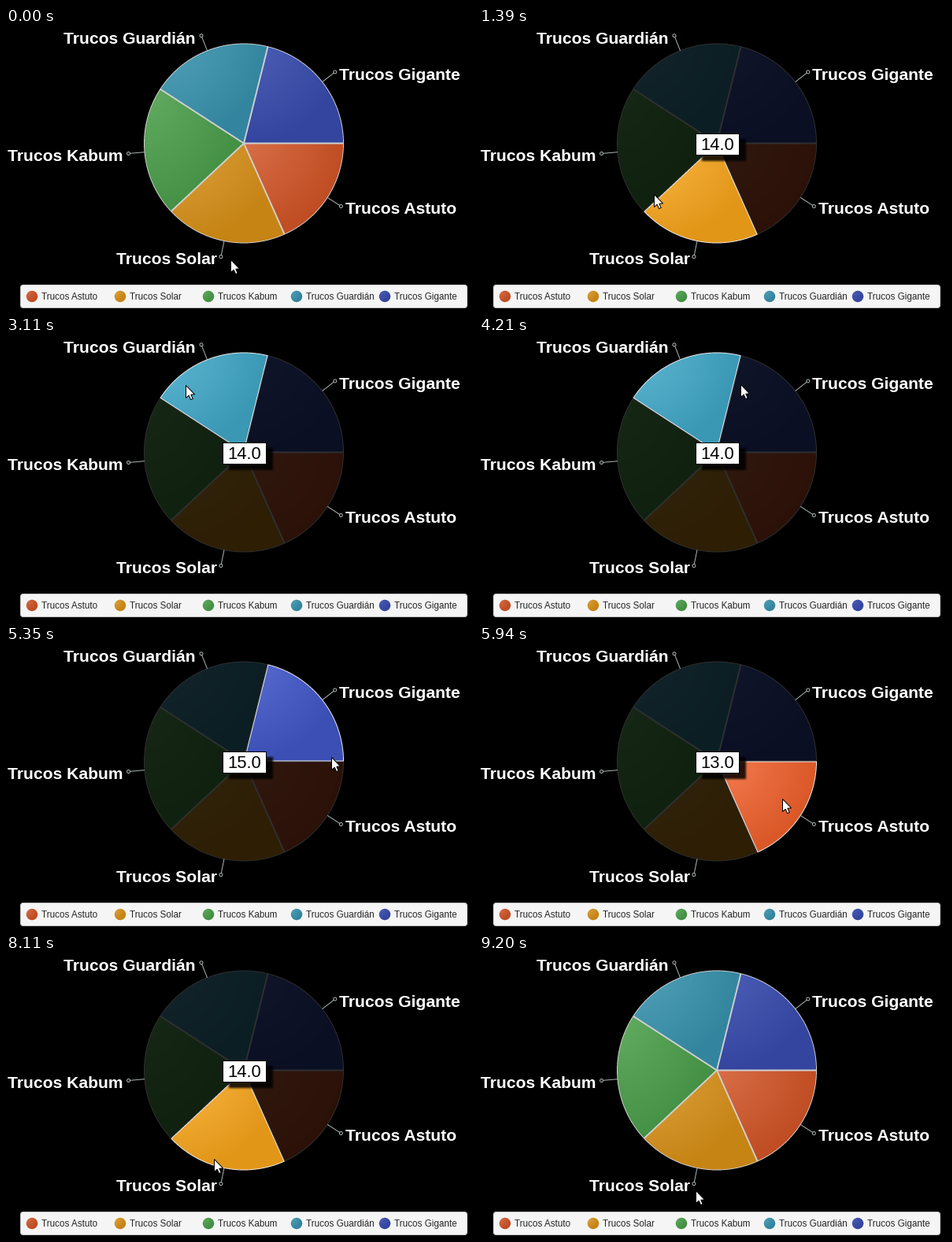
A matplotlib script that plays this animation: 593x357 px, repeating every 9.22 s.

```python
import colorsys

import numpy as np
import matplotlib.pyplot as plt
from matplotlib.animation import FuncAnimation
from matplotlib.colors import to_rgb
from matplotlib.patches import Circle, FancyBboxPatch, Polygon, Rectangle

W, H, DPI = 593, 357, 64
LOOP, STEP = 9220, 20
CX, CY, R = 302, 146.5, 127
SS = 4  # supersampling of the shaded shapes
NORMAL, DIM = 0.88, 0.2

# name, value, colour, label x, label baseline, legend dot x
SLICES = [
    ("Trucos Astuto", 13, "#f3622d", 431, 236, 33),
    ("Trucos Solar", 14, "#fba71b", 140, 300, 145),
    ("Trucos Kabum", 15, "#57b757", 2, 169, 257),
    ("Trucos Guardián", 14, "#41a9c9", 73, 20, 369),
    ("Trucos Gigante", 15, "#4258c9", 423, 66, 481),
]
ASTUTO, SOLAR, KABUM, GUARDIAN, GIGANTE = range(5)

# time, x, y of the pointer tip
PATH = np.array([
    (80, 285, 294), (480, 262, 237), (760, 262, 237), (1390, 222, 211),
    (1660, 204, 185), (2500, 192, 94), (2630, 192, 94), (3110, 228, 61),
    (3330, 228, 61), (3550, 255, 48), (3720, 255, 48), (4640, 400, 71),
    (5350, 413, 141), (5560, 411, 163), (6490, 350, 238), (6530, 350, 238),
    (6780, 334, 244), (7440, 284, 251), (7900, 264, 258), (8110, 264, 259),
    (8280, 265, 260), (8450, 265, 260), (8470, 266, 262), (8680, 266, 262),
    (9200, 275, 299),
])
HOVERS = [(0, None), (270, SOLAR), (1420, KABUM), (2850, GUARDIAN),
          (4320, GIGANTE), (5600, ASTUTO), (7490, SOLAR), (8890, None)]

ARROW = np.array([(0.5, 0.5), (0.5, 16.5), (4.2, 13.2), (6.6, 18.6),
                  (9.2, 17.5), (6.8, 12.2), (11.6, 12)])


def pt(px):
    return px * 72 / DPI


def tones(color):
    """Light and dark ends of the gradient for a base colour."""
    r, g, b = to_rgb(color)
    luma = 0.3 * r + 0.59 * g + 0.11 * b
    lift = 0.2 * (1 if luma > 0.6 else 0.9 if luma > 0.5 else
                  0.8 if luma > 0.4 else 0.7)
    h, s, v = colorsys.rgb_to_hsv(r, g, b)
    light = colorsys.hsv_to_rgb(h, s * (1 - lift), v + (1 - v) * lift)
    return np.array(light), np.array([r, g, b]) * 0.9


def shade(x, y, mask, color):
    """Radial gradient from the top left of the mask's bounding box."""
    x0, x1, y0, y1 = x[mask].min(), x[mask].max(), y[mask].min(), y[mask].max()
    t = np.hypot((x - x0) / (x1 - x0), (y - y0) / (y1 - y0)).clip(0, 1)
    light, dark = tones(color)
    return light + (dark - light) * t[..., None]


def grid(left, top, size):
    c = (np.arange(size * SS) + 0.5) / SS
    return np.meshgrid(left + c, top + c)


def shrink(img):
    n = img.shape[0] // SS
    return img.reshape(n, SS, n, SS, -1).mean(axis=(1, 3))


ends = np.cumsum([0] + [s[1] for s in SLICES])
ends = ends * 2 * np.pi / ends[-1]


def pie_layers(left, top, size):
    """One full-strength picture per slice, black elsewhere."""
    x, y = grid(left, top, size)
    r = np.hypot(x - CX, y - CY)
    a = np.arctan2(y - CY, x - CX) % (2 * np.pi)

    def ray_gap(turn):
        return np.where(turn < np.pi / 2, r * np.sin(turn), r)

    layers = []
    for s, a0, a1 in zip(SLICES, ends, ends[1:]):
        mask = (r < R) & (a >= a0) & (a < a1)
        rgb = shade(x, y, mask, s[2])
        gap = np.minimum(R - r, np.minimum(ray_gap(a - a0), ray_gap(a1 - a)))
        rgb[gap < 0.95] = 0.93
        layers.append(shrink(rgb * mask[..., None]))
    return layers


def legend_dot(cx, cy, color):
    x, y = grid(cx - 8, cy - 8, 16)
    mask = np.hypot(x - cx, y - cy) < 7.2
    rgb = shrink(shade(x, y, mask, color) * NORMAL)
    return np.dstack([rgb, shrink(mask.astype(float))])


def shadow(left, top, w, h):
    """Soft dark rectangle behind the value box."""
    def soft(p, lo, hi, blur=5):
        edge = np.minimum(p - lo, hi - p) / blur
        t = (edge + 0.5).clip(0, 1)
        return t * t * (3 - 2 * t)

    x, y = np.arange(w) + left + 0.5, np.arange(h) + top + 0.5
    img = np.zeros((h, w, 4))
    img[..., 3] = 0.85 * np.outer(soft(y, 141, 169), soft(x, 283, 339))
    return img


fig = plt.figure(figsize=(W / DPI, H / DPI), dpi=DPI, facecolor="black")
ax = fig.add_axes([0, 0, 1, 1])
ax.axis("off")


def place(img, left, top, z):
    h, w = img.shape[:2]
    return ax.imshow(img, extent=(left, left + w, top + h, top),
                     interpolation="nearest", aspect="auto", zorder=z)


def write(x, y, s, size, **kw):
    return ax.text(x, y, s, fontsize=pt(size), family="Liberation Sans",
                   va="baseline", **kw)


layers = pie_layers(174, 19, 256)


def pie_look(hot):
    def strength(i):
        return NORMAL if hot is None else 1 if i == hot else DIM
    return sum(layer * strength(i) for i, layer in enumerate(layers)).clip(0, 1)


looks = {hot: pie_look(hot) for hot in (None, *range(5))}
pie = place(looks[None], 174, 19, 1)

ax.add_patch(FancyBboxPatch((19.5, 327.5), 565, 27, mutation_aspect=1,
                            boxstyle="round,pad=1,rounding_size=3.5",
                            fc="#f5f5f5", ec="#c4c4c4", lw=pt(1)))

for (name, _, color, lx, ly, dot), a0, a1 in zip(SLICES, ends, ends[1:]):
    mid = (a0 + a1) / 2
    ux, uy = np.cos(mid), np.sin(mid)
    ax.plot([CX + R * ux, CX + 145 * ux], [CY + R * uy, CY + 145 * uy],
            color="#aab4b4", lw=pt(1), zorder=2)
    ax.add_patch(Circle((CX + 147 * ux, CY + 147 * uy), 2, fill=False,
                        ec="#aab4b4", lw=pt(1), zorder=2))
    write(lx, ly, name, 21.1, color="white", weight="bold", zorder=3)
    place(legend_dot(dot, 341, color), dot - 8, 333, 3)
    write(dot + 12, 345, name, 11.6, color="#262626", zorder=3)

box = [
    place(shadow(270, 130, 80, 50), 270, 130, 4),
    ax.add_patch(Rectangle((274.5, 133.5), 55, 27, fc="white", ec="black",
                           lw=pt(1), zorder=5)),
]
value = write(302.5, 155, "", 22, color="black", ha="center", zorder=6)
pointer = ax.add_patch(Polygon(ARROW, fc="white", ec="black", lw=pt(1),
                               joinstyle="miter", zorder=9))

ax.set_xlim(0, W)
ax.set_ylim(H, 0)


def draw(i):
    t = i * STEP + STEP / 2
    hot = [h for start, h in HOVERS if start <= t][-1]
    pie.set_data(looks[hot])
    for part in box:
        part.set_visible(hot is not None)
    value.set_text("" if hot is None else f"{SLICES[hot][1]:.1f}")
    tip = [np.interp(t, PATH[:, 0], PATH[:, k]) for k in (1, 2)]
    pointer.set_xy(ARROW + np.round(tip))
    return [pie, *box, value, pointer]


anim = FuncAnimation(fig, draw, frames=LOOP // STEP, interval=STEP,
                     repeat=True, repeat_delay=0)
plt.show()
```
